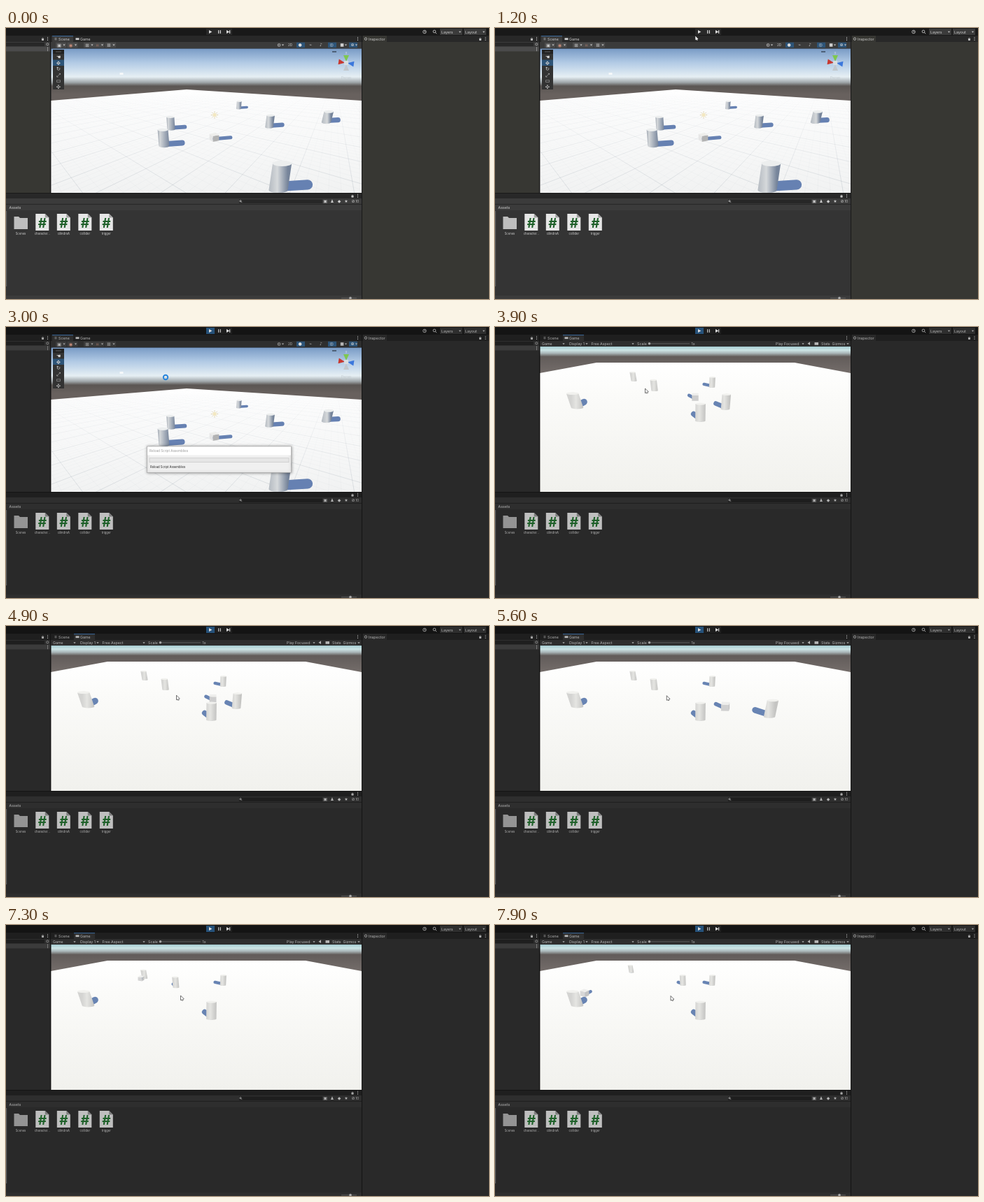
An HTML page with a canvas that plays this animation: 690x388 px, repeating every 8000 ms.

```html
<!DOCTYPE html>
<html>
<head>
<meta charset="utf-8">
<style>
html, body { margin: 0; width: 100%; height: 100%; overflow: hidden; background: #191919; }
canvas { display: block; }
</style>
</head>
<body>
<canvas id="stage" width="690" height="388"></canvas>
<script>
const ctx = document.getElementById('stage').getContext('2d');
const LOOP = 8000, PLAY_AT = 1400, GAME_AT = 3800;
const CENTER = 286.5, BLUE = '#2d5478';

// ---- helpers ----
const clamp = v => Math.max(0, Math.min(1, v));
const mix = (a, b, p) => a.map((v, i) => v + (b[i] - v) * p);
const span = (t, from, to) => clamp((t - from) / (to - from));

function track(t, keys) {
  const next = keys.findIndex(k => k.at > t);
  if (next < 0) return keys[keys.length - 1].to;
  if (next === 0) return keys[0].to;
  const a = keys[next - 1], b = keys[next];
  return mix(a.to, b.to, span(t, a.at, b.at));
}

// Every panel grey dims by the same share in play mode.
let ui;
function setTheme(playing) {
  const grey = (v, dim = 0.78) => {
    const c = Math.round(playing ? v * dim : v);
    return `rgb(${c},${c},${c})`;
  };
  ui = {
    bar: grey(25), tab: grey(40), head: grey(59), body: grey(52), row: grey(75), field: grey(39),
    side: playing ? grey(53) : '#373733',
    text: grey(207, 0.87), folder: grey(190), page: grey(230, 0.83), fold: grey(160)
  };
}

function rect(x, y, w, h, color) {
  ctx.fillStyle = color;
  ctx.fillRect(x, y, w, h);
}

function path(pts) {
  ctx.beginPath();
  pts.forEach(p => ctx.lineTo(p[0], p[1]));
}

function poly(color, ...pts) {
  path(pts);
  ctx.fillStyle = color;
  ctx.fill();
}

function line(color, width, ...pts) {
  path(pts);
  ctx.strokeStyle = color;
  ctx.lineWidth = width;
  ctx.stroke();
}

function disc(x, y, r, color) {
  ctx.fillStyle = color;
  ctx.beginPath();
  ctx.arc(x, y, r, 0, 7);
  ctx.fill();
}

function ring(x, y, r, color = ui.text, width = 0.8) {
  ctx.strokeStyle = color;
  ctx.lineWidth = width;
  ctx.beginPath();
  ctx.arc(x, y, r, 0, 7);
  ctx.stroke();
}

function text(str, x, y, { size = 5.3, color = ui.text, align = 'left', font = 'Inter', weight = 400 } = {}) {
  ctx.font = `${weight} ${size}px "${font}", sans-serif`;
  ctx.textAlign = align;
  ctx.fillStyle = color;
  ctx.fillText(str, x, y);
}

const glyph = (str, x, y, size = 7, color = ui.text) =>
  text(str, x, y + size * 0.36, { size, color, align: 'center', font: 'DejaVu Sans' });
const caret = (x, y) => poly(ui.text, [x - 1.6, y - 0.8], [x + 1.6, y - 0.8], [x, y + 1.2]);
const dots = (x, y) => [-2, 0, 2].forEach(d => rect(x - 0.5, y + d - 0.5, 1, 1, ui.text));

function lock(x, y) {
  rect(x - 1.5, y, 3, 2.3, ui.text);
  ring(x, y, 1.1, ui.text, 0.7);
}

function lens(x, y, r) {
  ring(x, y, r);
  line(ui.text, 0.9, [x + r * 0.7, y + r * 0.7], [x + r * 1.7, y + r * 1.7]);
}

function gradient(x0, y0, x1, y1, stops) {
  const g = ctx.createLinearGradient(x0, y0, x1, y1);
  stops.forEach(([p, c]) => g.addColorStop(p, c));
  return g;
}

function inside(pts, draw) {
  ctx.save();
  path(pts);
  ctx.clip();
  draw();
  ctx.restore();
}

// ---- solids: size, lean and shadow all follow from the foot point ----
const SCENE = {
  horizon: 70.5, height: 0.236, radius: 0.072, lean: 700, flat: 0.3, shadow: '#6681b2', cap: '#eceeee', contrast: 38,
  tip: (x, y, k) => [x + k * 0.26, y - k * 0.03],
  shades: x => [[0, '#b4bac1'], [clamp((x - 190) / 443), '#d6d9db'], [1, '#76849a']]
};
const GAME = {
  horizon: 20, height: 0.213, radius: 0.063, lean: 500, flat: 0.22, shadow: '#6884b3', cap: '#f1f1ee', contrast: 14,
  tip: (x, y) => mix([x, y], [206, 56], 0.11),
  shades: () => [[0, '#d4d4d2'], [0.4, '#e5e5e2'], [1, '#c4c4c2']]
};

function shadow(view, x, y, width) {
  ctx.lineCap = 'round';
  line(view.shadow, width, [x, y - width * 0.35], view.tip(x, y - width * 0.2, y - view.horizon));
  ctx.lineCap = 'butt';
}

function cylinder(view, x, y) {
  const k = y - view.horizon, dx = x - CENTER;
  const h = view.height * k, r = view.radius * k * (1 + (dx / 250) ** 2);
  const topX = x + h * dx / view.lean, topY = y - h;
  shadow(view, x, y, r * 1.05);
  ctx.fillStyle = gradient(x - r, 0, x + r, 0, view.shades(x));
  ctx.beginPath();
  ctx.moveTo(topX - r, topY);
  ctx.ellipse(x, y, r, r * view.flat, 0, Math.PI, 0, true);
  ctx.lineTo(topX + r, topY);
  ctx.fill();
  ctx.fillStyle = view.cap;
  ctx.beginPath();
  ctx.ellipse(topX, topY, r, r * view.flat, 0, 0, 7);
  ctx.fill();
}

function cube(view, x, y, yaw) {
  const s = 0.112 * (y - view.horizon), half = s * 0.707;
  shadow(view, x, y, s * 0.5);
  const foot = [0, 1, 2, 3].map(k => {
    const a = yaw + (k + 0.5) * Math.PI / 2;
    return [x + half * Math.cos(a), y + half * 0.35 * Math.sin(a)];
  });
  const top = foot.map(p => [p[0], p[1] - s * 0.8]);
  foot.forEach((p, k) => {
    const normal = yaw + (k + 1) * Math.PI / 2, n = (k + 1) % 4;
    if (Math.sin(normal) < 0.02) return;
    const v = Math.round(212 - view.contrast * (0.4 + Math.cos(normal)));
    poly(`rgb(${v},${v},${v})`, p, foot[n], top[n], top[k]);
  });
  poly('#eeeeec', ...top);
}

function drawSolids(view, cylinders, [x, y], yaw) {
  const items = cylinders.map(p => ({ y: p[1], draw: () => cylinder(view, ...p) }));
  items.push({ y, draw: () => cube(view, x, y, yaw) });
  items.sort((a, b) => a.y - b.y).forEach(item => item.draw());
}

// ---- scene view ----
function floorLines(vanishX, step, alpha) {
  const ink = gradient(0, 88, 0, 236, [[0, 'rgba(110,125,140,0)'], [1, `rgba(110,125,140,${alpha})`]]);
  for (let x = -2600; x < 3200; x += step) line(ink, 0.6, [vanishX, SCENE.horizon], [x, 250]);
}

function axisGizmo(x, y) {
  ['#7ec850', '#3c78dc', '#c2c8cd', '#c8382f'].forEach((color, i) => {
    ctx.save();
    ctx.translate(x, y);
    ctx.rotate(i * Math.PI / 2 + (i % 2) * 0.15);
    poly(color, [-4, -11], [4, -11], [0, -2]);
    ctx.restore();
  });
  rect(x - 3, y - 3, 6, 6, '#d8dee2');
  text('Persp', x, y + 23, { color: '#c4cdd3', align: 'center' });
  text('y', x, y - 13, { size: 4, color: '#e0e8ee', align: 'center' });
}

function toolPalette() {
  rect(67, 31, 16, 57, '#222');
  rect(67, 37, 16, 51, '#333');
  rect(67, 45.5, 16, 8.5, BLUE);
  line('#777', 0.7, [71, 34], [79, 34]);
  [...'☚✥↻⤢▭✣'].forEach((tool, i) => glyph(tool, 75, 41.3 + i * 8.5, 7.5, '#d2d2d2'));
}

function sunIcon(x, y) {
  disc(x, y, 2.7, '#f3e8c2');
  for (let a = 0; a < 6; a += Math.PI / 4) {
    const c = Math.cos(a), s = Math.sin(a);
    line('#d9cda8', 0.9, [x + 3.2 * c, y + 3.2 * s], [x + 5.2 * c, y + 5.2 * s]);
  }
}

function sceneView() {
  rect(64, 29, 444, 207, gradient(0, 29, 0, 95, [
    [0, '#7799c4'], [0.3, '#b0c9e4'], [0.62, '#e6eff4'], [0.74, '#a0a7aa'], [0.82, '#5b5653'], [1, '#68615e']]));
  inside([[64, 104], [258, 88], [508, 104], [508, 236], [64, 236]], () => {
    rect(64, 88, 444, 148, gradient(0, 88, 0, 236, [[0, '#ffffff'], [1, '#f1f2f2']]));
    [[-15, 160], [469, 100]].forEach(([vanishX, step]) => {
      floorLines(vanishX, step, 0.26);
      floorLines(vanishX, step / 5, 0.07);
    });
  });
  drawSolids(SCENE, [[332.5, 115.5], [457.5, 135], [376, 142], [236, 145], [226, 169], [389, 232]], [297.5, 160.5], -0.5);
  sunIcon(298, 124.5);
  rect(162.5, 64, 5, 3, '#f5f8fa');
  axisGizmo(486, 50);
  line('#3b4a5c', 1.4, [466, 34], [472, 34]);
  toolPalette();
}

function sceneBar() {
  [...'▣◉⊞⌗Ⅲ'].forEach((icon, i) => {
    const x = 76 + i * 16.5 + (i > 1) * 7 - (i > 2) * 2;
    rect(x - 5, 20.7, 15, 7.3, ui.row);
    glyph(icon, x, 24.3, 6.5, i % 2 ? '#c48a78' : ui.text);
    caret(x + 7, 24.3);
  });
  [...'◍2●⌁♪◎■⊕'].forEach((icon, i) => {
    const x = 391 + i * 15, lit = [2, 5, 7].includes(i);
    if (lit) rect(x - 6, 20.7, 12, 7.3, BLUE);
    if (icon === '2') text('2D', x, 26.1, { size: 4.6, align: 'center' });
    else glyph(icon, x - 1, 24.3, 6, lit ? '#ddd' : ui.text);
    if ([0, 6, 7].includes(i)) caret(x + 4.5, 24.3);
  });
}

// ---- game view ----
function gameView(t) {
  rect(64, 28, 444, 208, gradient(0, 28, 0, 68, [
    [0, '#a5cbd0'], [0.13, '#cde5e6'], [0.24, '#a9b5b7'], [0.36, '#625c5a'], [1, '#756e6b']]));
  poly(gradient(0, 51, 0, 236, [[0, '#ffffff'], [0.25, '#fbfbf9'], [1, '#f1f1ed']]),
    [64, 66], [145, 51], [428, 51], [508, 66], [508, 236], [64, 236]);

  const still = [[310, 86], [117.5, 115.5], [293.3, 134.5]];
  const far = mix([198.5, 77], [195, 68], span(t, 7250, 7900));
  const near = mix([228, 91], [268.5, 86], span(t, 6950, 7900));
  const pushed = mix([329, 117.5], [392, 130], Math.max(0, (t - 5170) / 430));
  const cylinders = [...still, far, near];
  if (t < 6400) cylinders.push(pushed);

  const cubeAt = track(t, [
    { at: 4700, to: [286, 104] }, { at: 5850, to: [341, 124] },
    { at: 7300, to: [193, 79] }, { at: 7900, to: [128, 101] }
  ]);
  drawSolids(GAME, cylinders, cubeAt, 0.65 * span(t, 5200, 7900));
}

function gameBar() {
  const labels = { 'Game': 67, 'Display 1': 106, 'Free Aspect': 137.5, 'Scale': 203, '1x': 280.5, 'Play Focused': 401, 'Stats': 466, 'Gizmos': 481.5 };
  Object.entries(labels).forEach(([label, x]) => text(label, x, 25.6));
  [98, 131, 197, 440, 504].forEach(x => caret(x, 24));
  line('#656565', 0.8, [219, 23.8], [278, 23.8]);
  disc(220.5, 23.8, 1.8, '#a5a5a5');
  poly(ui.text, [446.5, 23.7], [450, 21.3], [450, 26]);
  rect(456.5, 22, 5.5, 3.8, ui.text);
}

// ---- editor frame ----
function topBar(playing) {
  rect(0, 0, 690, 11, ui.bar);
  rect(286, 1, 37, 9, ui.tab);
  if (playing) rect(286, 1, 12, 9, '#26527a');
  [290, 315].forEach(x => poly('#dedede', [x, 3], [x, 8], [x + 4.3, 5.5]));
  [303, 305.7, 319].forEach(x => rect(x, 3.2, 1.3, 4.7, ui.text));
  ring(598, 5.5, 2.3);
  line(ui.text, 0.7, [598, 4], [598, 5.6], [599.3, 5.6]);
  lens(612, 5, 1.9);
  ['Layers', 'Layout'].forEach((label, i) => {
    const x = 620 + i * 34;
    rect(x, 1, 32, 9, ui.head);
    text(label, x + 2, 7.5);
    caret(x + 28.5, 5.5);
  });
}

function panels(game) {
  rect(0, 11, 690, 377, ui.bar);
  [[0, 63], [64, 444], [509, 181]].forEach(([x, w]) => {
    rect(x, 11, w, 9, ui.tab);
    rect(x, 20, w, 9, ui.head);
  });
  rect(0, 27, 63, 209, ui.side);
  rect(0, 27, 63, 6.5, ui.row);
  rect(0, 21, 55, 5, ui.field);
  ring(59.3, 23.3, 1.6, ui.text, 0.6);
  dots(59.5, 30.3);

  const tabX = game ? 97 : 66;
  rect(tabX, 11, 30, 9, ui.head);
  rect(tabX, 11, 30, 0.8, '#3a72b0');
  glyph('⌗', 71, 15.7);
  text('Scene', 75, 17.6);
  rect(99.5, 14.3, 5, 2.8, ui.text);
  text('Game', 106, 17.6);

  rect(510, 11, 34, 9, ui.side);
  rect(509, 20, 181, 368, ui.side);
  ring(514, 15.6, 1.7);
  text('Inspector', 518, 17.6);
  [52.5, 677.5].forEach(x => lock(x, 15.5));
  [59.5, 502.5, 685].forEach(x => dots(x, 15.5));
}

const fileLabel = (label, x) => text(label, x, 296, { size: 4.2, align: 'center' });

function scriptFile(label, x) {
  const l = x - 9.5, r = x + 9.5, cut = x + 4;
  poly(ui.page, [l, 266], [cut, 266], [r, 271.5], [r, 290], [l, 290]);
  poly(ui.fold, [cut, 266], [r, 271.5], [cut, 271.5]);
  text('#', x, 285.8, { size: 19, color: '#1e6029', align: 'center', weight: 700 });
  fileLabel(label, x);
}

function project() {
  rect(0, 237, 508, 7, ui.tab);
  rect(0, 244, 508, 17, ui.head);
  rect(0, 261, 508, 122, ui.body);
  rect(0, 383, 508, 5, ui.head);
  line(ui.bar, 0.6, [0, 252.4], [508, 252.4]);
  rect(0, 262, 1.2, 108, '#606060');
  rect(333, 245.5, 119, 5.6, ui.field);
  lens(335, 247.8, 1.1);
  lock(495, 240.3);
  dots(502.5, 240.3);
  [...'▣♟◆★⊘'].forEach((icon, i) => glyph(icon, 456 + i * 10, 248.3, 6));
  text('10', 499.5, 250, { size: 4.5 });
  text('Assets', 4.5, 258.7);
  poly(ui.folder, [11.5, 270], [18, 270], [20, 272], [31, 272], [31, 288], [11.5, 288]);
  fileLabel('Scenes', 21);
  ['character...', 'cilindroA', 'collider', 'trigger'].forEach((label, i) => scriptFile(label, 51.8 + i * 30.5));
  line('#666', 0.8, [479, 386.7], [501, 386.7]);
  disc(492, 386.5, 1.8, '#a8a8a8');
}

// ---- overlays ----
function outlined(x, y, w, h, fill, stroke) {
  rect(x, y, w, h, fill);
  ctx.strokeStyle = stroke;
  ctx.lineWidth = 0.6;
  ctx.strokeRect(x, y, w, h);
}

function dialog(t) {
  const shown = span(t, 1700, 2000) - span(t, 3200, 3500);
  if (shown <= 0) return;
  const midX = 304.5, midY = 189.5, scale = 0.96 + 0.04 * shown;
  ctx.save();
  ctx.globalAlpha = Math.min(1, shown * 1.3);
  ctx.translate(midX, midY);
  ctx.scale(scale, scale);
  ctx.translate(-midX, -midY);
  ctx.shadowColor = 'rgba(0,0,0,.4)';
  ctx.shadowBlur = 4 * shown;
  outlined(201.5, 171, 206, 37.5, '#f0f0f0', '#a0a0a0');
  ctx.shadowColor = 'transparent';
  rect(202, 171.5, 205, 12, '#fff');
  outlined(205, 187.7, 199, 6, '#e6e6e6', '#c4c4c4');
  text('Reload Script Assemblies', 205, 179.3, { size: 4.6, color: '#999' });
  text('Reload Script Assemblies', 206, 202.2, { size: 4.2, color: '#222' });
  ctx.restore();
}

function arrow(x, y) {
  line('#333', 2, [x + 1.8, y + 4], [x + 3.2, y + 7.2]);
  poly('#fff', [x, y], [x, y + 6.6], [x + 4.7, y + 4.7]);
  line('#333', 0.7, [x, y], [x, y + 6.6], [x + 4.7, y + 4.7], [x, y]);
  line('#fff', 1, [x + 1.8, y + 4], [x + 3, y + 6.8]);
}

function pointer(t) {
  if (t < 300) return;
  const [x, y] = track(t, [
    { at: 300, to: [400, 215] }, { at: 1200, to: [286, 11] }, { at: 1900, to: [286, 11] },
    { at: 2200, to: [228, 72] }, { at: 3300, to: [228, 72] }, { at: 3700, to: [214.5, 88] },
    { at: 3900, to: [214.5, 88] }, { at: 4700, to: [243, 99] }, { at: 7900, to: [251, 101.5] }
  ]);
  if (t >= PLAY_AT && t < 3500) ring(x, y, 3.2, '#2584dc', 1.9);
  else arrow(x, y);
}

function draw(t) {
  const playing = t >= PLAY_AT, game = t >= GAME_AT, top = game ? 28 : 29.5;
  setTheme(playing);
  panels(game);
  topBar(playing);
  (game ? gameBar : sceneBar)();
  inside([[64.5, top], [508, top], [508, 236], [64.5, 236]], () => (game ? gameView : sceneView)(t));
  project();
  dialog(t);
  pointer(t);
}

const start = performance.now();
function frame() {
  const t = (performance.now() - start) % LOOP;
  draw(Math.floor(t / 100) * 100);
  requestAnimationFrame(frame);
}
frame();
</script>
</body>
</html>
```
